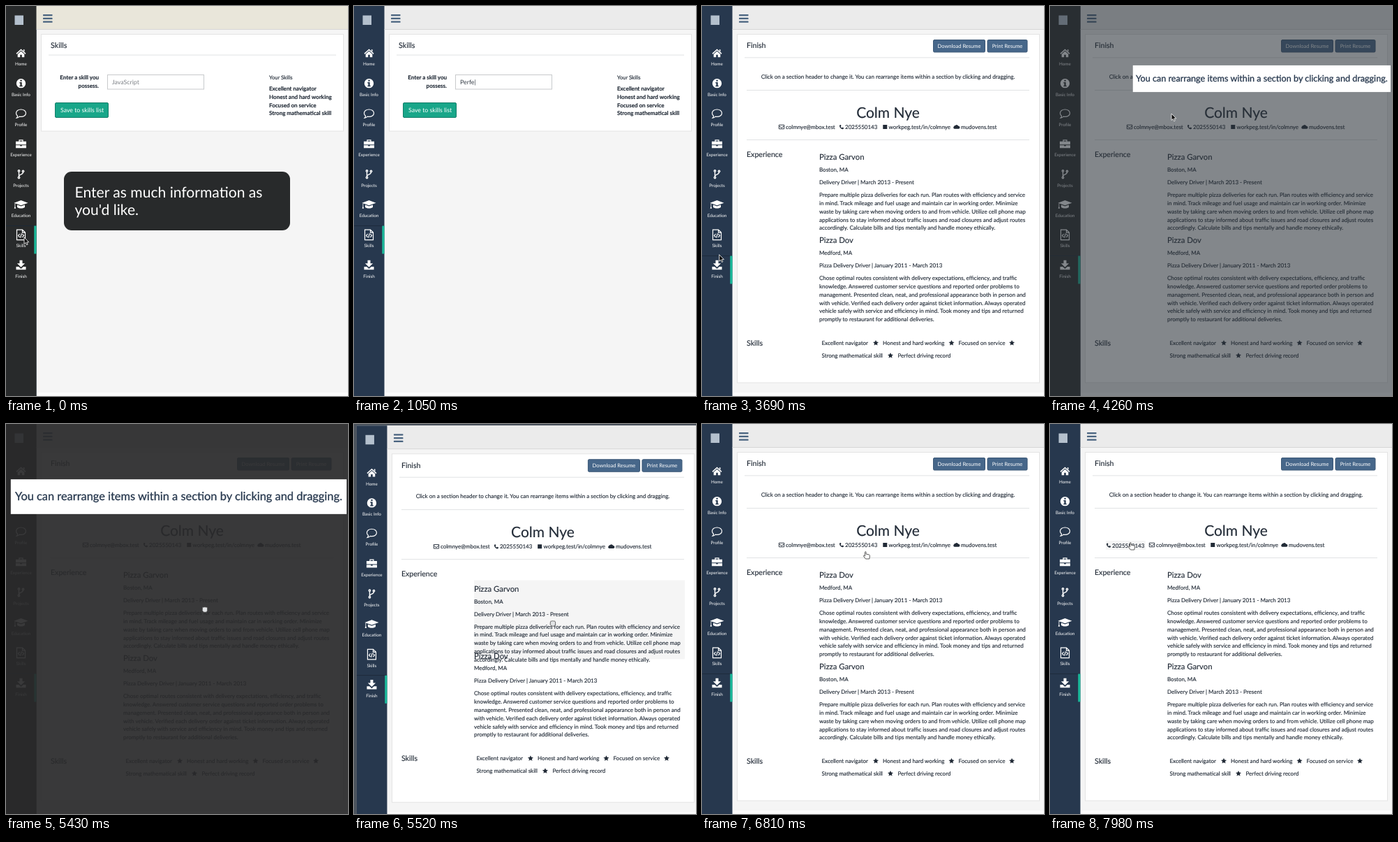
Write an HTML page that moves like this. It is 490 px wide and 558 px high and loops after 8000 ms.

```html
<!DOCTYPE html>
<html lang="en">
<head>
<meta charset="utf-8">
<title>Resume builder</title>
<style>
html, body { margin: 0; width: 490px; height: 558px; overflow: hidden; }
svg { display: block; font-family: Lato, sans-serif; text-rendering: geometricPrecision; }
.nav text { text-anchor: middle; }
.nav, .white { fill: #fff; }
.line { fill: none; stroke: currentColor; }
.nav { color: #fff; }
.ink { fill: #222b37; color: #222b37; }
.ink text { stroke: #222b37; stroke-width: .14px; }
.bold { font-weight: 700; }
.end { text-anchor: end; }
.mid { text-anchor: middle; }
</style>
</head>
<body>
<svg id="stage" width="490" height="558" viewBox="0 0 490 558"></svg>
<script>
const LOOP = 8000, BODY = 8;
const SKILL = 'Perfect driving record';
const CALL = 'You can rearrange items within a section by clicking and dragging.';

// Markup helpers
const text = (x, y, s, size = BODY, cls = '') =>
  `<text x="${x}" y="${y}" font-size="${size}" class="${cls}">${s}</text>`;
const rect = (x, y, w, h, fill, extra = '') =>
  `<rect x="${x}" y="${y}" width="${w}" height="${h}" fill="${fill}" ${extra}/>`;
const rule = (x1, x2, y) => rect(x1, y, x2 - x1, 0.8, '#dadcde');
const solid = d => `<path d="${d}" fill-rule="evenodd"/>`;
const line = (d, w = 1.2) => `<path d="${d}" class="line" stroke-width="${w}"/>`;
const at = (x, y, s, id = '') => `<g ${id && `id="${id}"`} transform="translate(${x} ${y})">${s}</g>`;

const icons = {
  home: solid('M-7 .5 0-5.7 7 .5 6 1.6 0-3.8-6 1.6ZM-4.8 1.8 0-2.5 4.8 1.8V6H1.3V2.4H-1.3V6H-4.8ZM3.3-5H5V-1.8L3.3-3.3Z'),
  info: solid('M-6.7 0a6.7 6.7 0 1 0 13.4 0a6.7 6.7 0 1 0-13.4 0ZM-1.1-4.8h2.3v2h-2.3ZM-2.1-1.6h3.3v4.6h1v1.5h-4.3v-1.5h1v-3.1h-1Z'),
  comment: line('M0-6c4 0 7 2.2 7 5.2s-3 5.2-7 5.2c-.8 0-1.5 0-2.2-.3-1 .9-2.3 1.7-4 2 .8-.8 1.3-1.7 1.3-2.8C-6.3 2.2-7 .7-7-.8c0-3 3-5.2 7-5.2Z'),
  briefcase: solid('M-7.5-3.6h4.4v-2.6h6.2v2.6h4.4v4.6h-15ZM-1.8-3.6h3.6v-1.3h-3.6ZM-7.5 1.8h6.2v1.3h2.6v-1.3h6.2v4.2h-15Z'),
  fork: line('M-3-3.4v6.8M-3 3c0-3 6-2 6-6M-4.2-4.8a1.2 1.2 0 1 0 2.4 0a1.2 1.2 0 1 0-2.4 0M1.8-4.2a1.2 1.2 0 1 0 2.4 0a1.2 1.2 0 1 0-2.4 0M-4.2 4.8a1.2 1.2 0 1 0 2.4 0a1.2 1.2 0 1 0-2.4 0', 1.4),
  cap: solid('M0-6 10-2.4 0 1.2-10-2.4ZM-5.5.5 0 2.5 5.5.5V3.6C4 6-4 6-5.5 3.6ZM-9-1.6h.8v4.2l.8 3h-2.4l.8-3Z'),
  code: line('M-6-7.3H2L6-3.3V7.3H-6ZM2-7.3V-3.3H6M-1.9-1.3-4 1-1.9 3.4M1.9-1.3 4 1 1.9 3.4M.8-2-.8 4.2'),
  download: solid('M-2-7h4v4.6h3.6L0 3-5.6-2.4h3.6ZM-7 2.3h3.8L0 5.2 3.2 2.3H7V6.5H-7Z'),
  mail: line('M-3.7-2.8h7.4v5.6h-7.4ZM-3.7-1.4 0 1.4 3.7-1.4', 0.9),
  phone: solid('M-2.9-2.2C-2.6-3.2-1.3-3.4-1-2.6l.5 1.3-.9.9c.4 1 1 1.5 1.9 1.9l.9-.9 1.4.7c.6.4.2 1.6-1 1.9C-.2 3.8-3.7.2-2.9-2.2Z'),
  square: solid('M-3-3h6v6h-6Z'),
  cloud: solid('M-2.8 2.8a2 2 0 0 1-.6-3.6a1.8 1.8 0 0 1 1.9-1.3a2.6 2.6 0 0 1 4.3.9a2 2 0 0 1 .3 4Z'),
  star: solid('M0-4 1.2-1.4 4-1.1 1.9.8 2.5 3.6 0 2.2-2.5 3.6-1.9.8-4-1.1-1.2-1.4Z'),
};

const nav = [['home', 'Home'], ['info', 'Basic Info'], ['comment', 'Profile'], ['briefcase', 'Experience'],
  ['fork', 'Projects'], ['cap', 'Education'], ['code', 'Skills'], ['download', 'Finish']]
  .map(([icon, label], i) => {
    const y = 67.3 + 43.35 * i;
    return at(21.5, y, icons[icon]) + text(21.5, y + 18, label, 6.3);
  }).join('');

const card = h => rect(50.5, 40.5, 433, h, '#fff', 'stroke="#e4e4e4"');
const button = (x, y, w, h, fill, edge) => rect(x, y, w, h, fill, `rx="1.5" stroke="${edge}"`);

const skillsPage = card(138.5) + `<g class="ink">
  ${text(64, 60.2, 'Skills', 10.7)}${rule(61, 473, 69.7)}
  ${text(133, 105.4, 'Enter a skill you', BODY, 'bold end')}
  ${text(133, 117.2, 'possess.', BODY, 'bold end')}
  ${rect(145.5, 98.5, 138, 20.5, '#fff', 'stroke="#c8cacc"')}
  ${text(377, 104.6, 'Your Skills', 7.6)}
  ${['Excellent navigator', 'Honest and hard working', 'Focused on service', 'Strong mathematical skill']
    .map((s, i) => text(377, 121 + 11.8 * i, s, BODY, 'bold')).join('')}
  <g id="added">${text(377, 168.2, SKILL, BODY, 'bold')}</g></g>
  <text id="entry" x="152" y="111.6" font-size="8.8"></text>
  ${button(70.5, 138.5, 76, 21, '#18a689', '#137d69')}${text(78, 152, 'Save to skills list', 8.75, 'white')}`;

const job = (id, name, town, role, lines) => `<g id="${id}">
  ${id === 'garvon' ? rect(0, 0, 302, 113, '#f5f5f5', 'id="lifted"') : ''}
  ${text(0, 16.3, name, 11.3)}${text(0, 33.2, town)}${text(0, 51.2, role)}
  ${lines.map((s, i) => text(0, 69.2 + 11.8 * i, s)).join('')}</g>`;

const contact = (id, icon, w, s) =>
  at(0, 0, (id === 'phone' ? rect(-1, 166.5, 57, 13, '#f5f5f5', 'id="held"') : '') +
    at(w / 2, 173, icons[icon]) + text(w + 2, 176, s), id);

const skill = (x, y, s, star) => text(x, y, s) + (star ? at(star, y - 2.8, icons.star) : '');

const finishPage = card(498.5) + `
  ${button(331.5, 48.5, 74, 17.5, '#47678a', '#3c5876')}${button(409, 48.5, 57, 17.5, '#47678a', '#3c5876')}
  ${text(368.5, 60, 'Download Resume', 7.5, 'white mid')}${text(437.5, 60, 'Print Resume', 7.5, 'white mid')}
  <g class="ink">
  ${text(64, 60.4, 'Finish', 10.6)}${rule(61, 469, 73.5)}
  ${text(266.5, 104, 'Click on a section header to change it. ' + CALL, BODY, 'mid')}
  ${rule(64, 469, 120)}${text(266.5, 159.6, 'Colm Nye', 21, 'mid')}${rule(64, 469, 191)}
  ${contact('mail', 'mail', 8, 'colmnye@mbox.test')}
  ${contact('site', 'square', 6.5, 'workpeg.test/in/colmnye')}
  ${contact('cloud', 'cloud', 9, 'mudovens.test')}
  ${contact('phone', 'phone', 6, '2025550143')}
  ${text(64, 216, 'Experience', 10.6)}
  <g id="skillRows">${text(64, 485.5, 'Skills', 10.6)}
  ${skill(171.5, 484.8, 'Excellent navigator', 249)}${skill(259, 484.8, 'Honest and hard working', 357.5)}
  ${skill(367.5, 484.8, 'Focused on service', 444)}
  ${skill(171.5, 502.8, 'Strong mathematical skill', 270)}${skill(280.5, 502.8, SKILL)}</g>
  ${job('garvon', 'Pizza Garvon', 'Boston, MA', 'Delivery Driver | March 2013 - Present', [
    'Prepare multiple pizza deliveries for each run. Plan routes with efficiency and service',
    'in mind. Track mileage and fuel usage and maintain car in working order. Minimize',
    'waste by taking care when moving orders to and from vehicle. Utilize cell phone map',
    'applications to stay informed about traffic issues and road closures and adjust routes',
    'accordingly. Calculate bills and tips mentally and handle money ethically.'])}
  ${job('dov', 'Pizza Dov', 'Medford, MA', 'Pizza Delivery Driver | January 2011 - March 2013', [
    'Chose optimal routes consistent with delivery expectations, efficiency, and traffic',
    'knowledge. Answered customer service questions and reported order problems to',
    'management. Presented clean, neat, and professional appearance both in person and',
    'with vehicle. Verified each delivery order against ticket information. Always operated',
    'vehicle safely with service and efficiency in mind. Took money and tips and returned',
    'promptly to restaurant for additional deliveries.'])}
  </g>`;

const outline = (fill, edge, d) => `<path d="${d}" fill="${fill}" stroke="${edge}" stroke-width=".8" stroke-linejoin="round"/>`;

document.getElementById('stage').innerHTML = `
  ${rect(0, 0, 490, 558, '#4a525c')}
  <g id="page">
    ${rect(0, 0, 490, 558, '#f5f5f5')}${rect(44, 553, 446, 5, '#fbfbfb')}
    ${rect(43, 0, 447, 33, '#ebebeb')}${rect(0, 0, 43.5, 558, '#27384e')}
    ${rect(43, 0, 447, 33, '#e9e6da', 'id="warmBar"')}${rect(0, 0, 43.5, 558, '#282a2b', 'id="darkSide"')}
    ${rect(43.5, 33, 446.5, 0.9, '#d3d3d3')}
    ${[12, 16.8, 21.6].map(y => rect(53, y, 13.5, 2.2, '#4a6480', 'rx=".6"')).join('')}
    ${rect(12.5, 13.5, 12.5, 13.5, '#b4c0cd')}
    <g id="tab">${rect(0, 0, 43, 0.8, '#1b2838')}${rect(40.3, 0.5, 3.2, 40, '#1abc9c')}</g>
    <g class="nav">${nav}</g>
    <g id="skills">${skillsPage}</g>
    <g id="finish">${finishPage}</g>
  </g>
  ${rect(0, 0, 490, 558, '#2a2a2b', 'id="dim"')}
  <g id="callout"><rect id="box" fill="#fff"/><text id="call" class="mid" fill="#27384e" stroke="#27384e" stroke-width=".3">${CALL}</text></g>
  <g id="tip">${rect(83, 237, 324, 84, '#282a2b', 'rx="11"')}
    ${text(98.5, 274, 'Enter as much information as', 21.1, 'white')}${text(98.5, 299, "you'd like.", 21.1, 'white')}</g>
  <g id="cursor">
    <g id="arrow">${outline('#111', '#fff', 'M0 0V9.5L2.2 7.5 3.7 10.8 5.2 10.1 3.8 6.9H6.8Z')}</g>
    <g id="hand">${outline('#fff', '#333', 'M-2.5-4.5c0-1.2 1.6-1.2 1.6 0v2.6l3.9.8c1.2.3 1.5 1 1.4 2L3.8 5H-1.6L-4.5 1.2c-.4-.9.4-1.6 1.1-1l.9.8Z')}</g>
    <g id="fist">${outline('#e2e4e6', '#444', 'M-3.6-1.6c0-2 1.8-2 2.3-1.3.6-.9 1.9-.9 2.4 0 .8-.7 2.5-.3 2.5 1.3V1.5L2.4 4H-2L-3.8 1.5Z')}</g>
  </g>`;

const $ = Object.fromEntries([...document.querySelectorAll('[id]')].map(e => [e.id, e]));
const clamp = v => Math.max(0, Math.min(1, v));
const mix = (a, b, p) => a + (b - a) * p;
const show = (el, on) => el.setAttribute('display', on ? 'inline' : 'none');
const move = (el, x, y) => el.setAttribute('transform', `translate(${x} ${y})`);
const set = (el, attrs) => Object.entries(attrs).forEach(([k, v]) => el.setAttribute(k, v));

// Pointer stops: time, x, y
const stops = [[60, 26, 331], [780, 215, 108], [1830, 215, 108], [2150, 101, 158], [2340, 101, 158],
  [2490, 23, 358], [3690, 23, 358], [3780, 174, 154], [4300, 174, 154], [4920, 285, 265], [5430, 285, 265],
  [5520, 285, 285], [6030, 275, 400], [6240, 275, 395], [6480, 275, 395], [6810, 236, 188],
  [6960, 236, 188], [7020, 233, 174], [7320, 233, 174], [7980, 117, 175]];
const shapes = [[0, 'arrow'], [800, ''], [1830, 'arrow'], [2100, 'hand'], [2380, 'arrow'], [2480, 'hand'],
  [3690, 'arrow'], [4920, 'fist'], [5850, 'hand']];

function pointer(t) {
  const i = stops.findIndex(s => s[0] > t);
  if (i === 0) return stops[0].slice(1);
  if (i < 0) return stops.at(-1).slice(1);
  const [a, b] = [stops[i - 1], stops[i]], p = (t - a[0]) / (b[0] - a[0]);
  return [mix(a[1], b[1], p), mix(a[2], b[2], p)];
}

function draw(t) {
  const [cx, cy] = pointer(t);
  const shape = shapes.findLast(s => s[0] <= t)[1];
  move($.cursor, cx, cy);
  for (const id of ['arrow', 'hand', 'fist']) show($[id], id === shape);

  // Callout grows until it meets the right margin, then spreads left
  const zoom = Math.min(clamp((t - 4200) / 112), clamp((5520 - t) / 90));
  const w = mix(232, 484, zoom), h = mix(24, 50, zoom), right = Math.min(488, 333 + w / 2);
  const size = mix(BODY, 16.5, zoom);
  show($.callout, zoom > 0);
  set($.box, { x: right - w, y: 104 - h / 2, width: w, height: h });
  set($.call, { x: right - w / 2, y: 103.7 + size * 0.31, 'font-size': size });
  set($.dim, {
    opacity: 0.925 * clamp(zoom * 1.15),
    fill: `rgb(42, ${mix(58, 42, zoom)}, ${mix(72, 43, zoom)})`,
  });
  const slide = t >= 5460 ? clamp((5580 - t) / 120) : 0;
  move($.page, 8 * slide, 4.6 * slide);

  const tip = clamp(1 - (t - 30) / 400);
  set($.tip, { opacity: tip });
  set($.warmBar, { opacity: tip });
  set($.darkSide, { opacity: Math.max(tip, clamp(zoom * 2)) });

  // Skills form
  const done = t >= 3690, saved = t >= 2510;
  show($.skills, !done);
  show($.finish, done);
  show($.added, saved);
  move($.tab, 0, done ? 357 : 314);
  const typed = saved ? '' : SKILL.slice(0, Math.max(0, Math.floor((t - 870) / 43) + 1));
  $.entry.textContent = typed ? typed + '|' : 'JavaScript';
  set($.entry, { fill: typed ? '#333b45' : '#7d8186' });

  // Jobs reorder
  const dragging = t > 5440 && t < 6270, swapped = t >= 5850;
  show($.lifted, dragging);
  move($.dov, 168, swapped ? 204 : dragging ? 317 : 323);
  if (dragging) move($.garvon, 168 + cx - 285, 204 + Math.max(0, cy - 268) + (swapped ? 14 : 0));
  else move($.garvon, 168, swapped ? 335 : 204);
  move($.skillRows, 0, dragging ? -6 : 0);

  // Contact items close up while the phone is held
  const held = t >= 7320;
  show($.held, held);
  move($.mail, held ? 142 : 110, 0);
  move($.site, held ? 230 : 259, 0);
  move($.cloud, held ? 331 : 360, 0);
  move($.phone, held ? 197 + cx - 233 : 197, held ? (cy - 174) / 2 : 0);
}

function tick() {
  draw(performance.now() % LOOP);
  requestAnimationFrame(tick);
}
tick();
</script>
</body>
</html>
```
